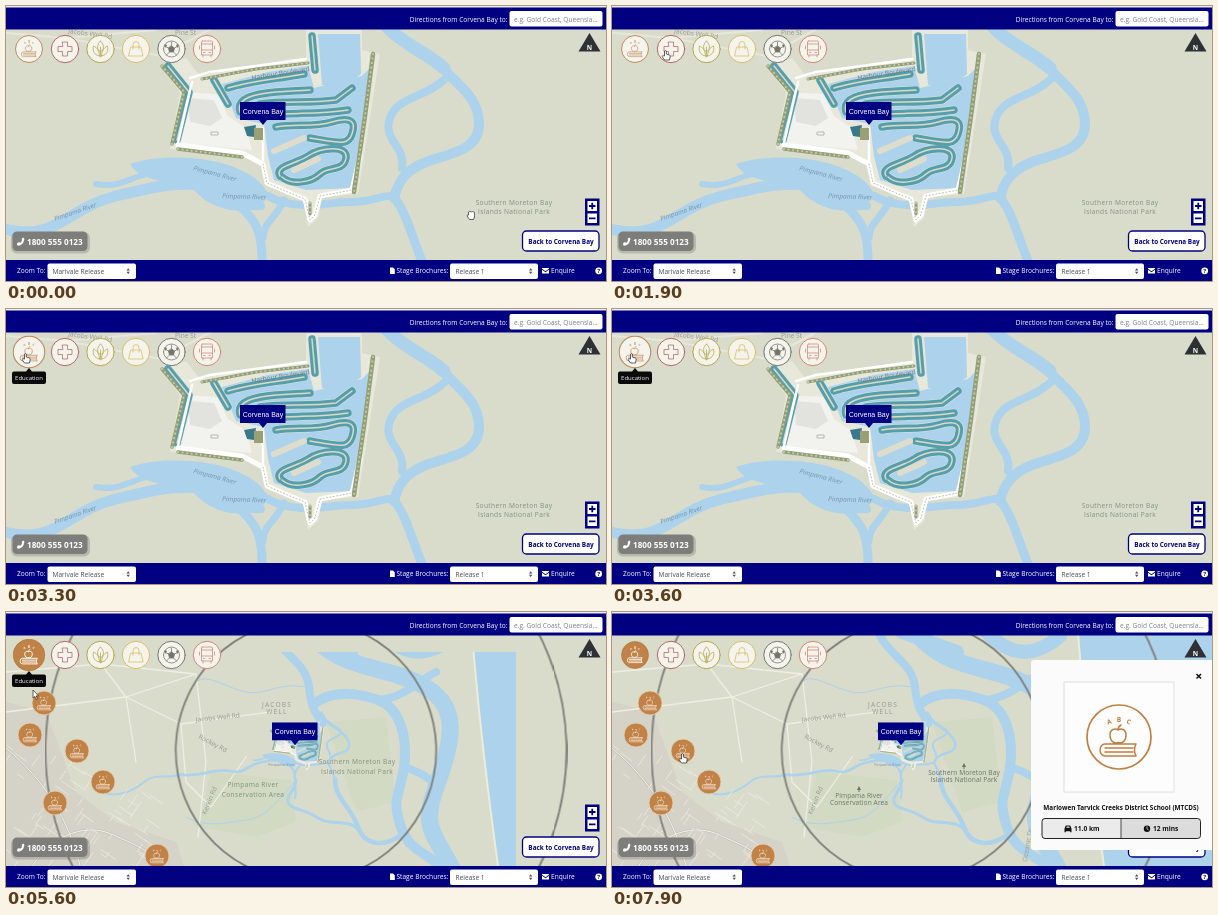
Recreate the animation shown at these times as an HTML page. Size 600 by 275 pixels, loop 8000 ms.

```html
<!DOCTYPE html>
<html lang="en">
<head>
<meta charset="utf-8">
<title>Estate map</title>
<style>
html, body { margin: 0; width: 100%; height: 100%; overflow: hidden; background: #d9dcca; }
svg { position: absolute; left: 0; top: 0; width: 600px; height: 275px; }
text { font-family: "Open Sans", "Noto Sans", sans-serif; font-size: 6.6px; }
.mid { text-anchor: middle; }
.bold { font-weight: 700; }
.line { fill: none; stroke-linecap: round; stroke-linejoin: round; }
.water { stroke: #add2eb; }
.park { fill: #83907f; letter-spacing: .35px; font-size: 6.7px; }
.small { fill: #68746a; font-size: 4.8px; letter-spacing: .1px; }
.street { fill: #96998f; font-size: 4.6px; }
.river { fill: #7496ae; font-size: 5.2px; font-style: italic; }

/* every state runs on one 8 s clock; 1.25% = 100 ms */
.near, .far, .zoom, .pin, .hover, .active, .rest, .tip, .marks, .wideA, .tinyA, .wideB, .tinyB,
.panel, .loaded, .short, .tall, .shift, .move, .grab, .point, .arrow { animation: 8s step-end infinite; }
.near { animation-name: near; }
.far { animation-name: tiles; }
.zoom { transform-origin: 300px 138px; animation-name: zoom; }
.pin { animation-name: pin; }
.hover { transform-origin: 23px 43px; animation-name: hover; }
.active { animation-name: active; }
.rest { animation-name: rest; }
.tip { animation-name: tip; }
.marks { animation-name: marks; }
.wideA { animation-name: untilA; }
.tinyA { animation-name: fromA; }
.wideB, .short { animation-name: untilB; }
.tinyB, .tall, .loaded { animation-name: fromB; }
.shift { animation-name: shift; }
.panel { animation-name: slide; }
.move { animation-name: move; }
.grab { animation-name: grab; }
.point { animation-name: point; }
.arrow { animation-name: arrow; }

@keyframes near { 0% { visibility: visible } 52.5%, 100% { visibility: hidden } }
@keyframes tiles {
  0% { visibility: hidden; clip-path: inset(96px 203px 66px 173px) }
  52.5% { visibility: visible; clip-path: inset(96px 203px 66px 173px) }
  57.5% { visibility: visible; clip-path: inset(40px 90px 0 0) }
  77.5%, 100% { visibility: visible; clip-path: inset(0) }
}
@keyframes zoom {
  0% { transform: scale(1) } 47.5% { transform: scale(.7) }
  48.75% { transform: scale(.36) } 52.5%, 100% { transform: scale(.25) }
}
@keyframes pin {
  0% { transform: translate(257px, 119px) } 47.5% { transform: translate(269.9px, 124.7px) }
  48.75% { transform: translate(284.5px, 131.2px) } 52.5%, 100% { transform: translate(289px, 133.3px) }
}
@keyframes hover { 0% { transform: none } 40% { transform: scale(1.17) } 77.5%, 100% { transform: none } }
@keyframes active { 0% { visibility: hidden } 47.5%, 100% { visibility: visible } }
@keyframes rest { 0% { visibility: visible } 47.5%, 100% { visibility: hidden } }
@keyframes tip { 0% { visibility: hidden } 40% { visibility: visible } 77.5%, 100% { visibility: hidden } }
@keyframes marks { 0% { visibility: hidden } 55%, 100% { visibility: visible } }
@keyframes untilA { 0% { opacity: 1 } 77.5%, 100% { opacity: 0 } }
@keyframes fromA { 0% { opacity: 0 } 77.5%, 100% { opacity: 1 } }
@keyframes untilB { 0% { opacity: 1 } 95%, 100% { opacity: 0 } }
@keyframes fromB { 0% { opacity: 0 } 95%, 100% { opacity: 1 } }
@keyframes shift { 0% { transform: translateY(-66px) } 95%, 100% { transform: none } }
@keyframes slide {
  0% { transform: translateX(182px) } 86.25% { transform: translateX(170px) }
  87.5% { transform: translateX(105px) } 88.75% { transform: translateX(49px) }
  90% { transform: translateX(20px) } 91.25% { transform: translateX(5px) }
  92.5%, 100% { transform: none }
}
@keyframes move {
  0% { transform: translate(465px, 209px) }
  2.5% { transform: translate(465px, 209px); animation-timing-function: steps(2, jump-start) }
  5% { transform: translate(435px, 112px) }
  7.5% { transform: translate(415px, 105px) }
  10% { transform: translate(415px, 105px); animation-timing-function: steps(7, jump-start) }
  18.75% { transform: translate(190px, 62px) }
  20% { transform: translate(190px, 62px); animation-timing-function: steps(2, jump-start) }
  22.5% { transform: translate(90px, 52px) }
  23.75% { transform: translate(54px, 49px) }
  25% { transform: translate(51px, 50px) }
  27.5% { transform: translate(51px, 50px); animation-timing-function: steps(7, jump-start) }
  36.25% { transform: translate(32px, 53px) }
  37.5% { transform: translate(27px, 51px) }
  40% { transform: translate(20px, 49px) }
  61.25% { transform: translate(22px, 60px) }
  63.75% { transform: translate(22px, 60px); animation-timing-function: steps(2, jump-start) }
  66.25% { transform: translate(26px, 76px) }
  70% { transform: translate(27px, 78px) }
  77.5%, 100% { transform: translate(71px, 146px) }
}
@keyframes grab { 0% { visibility: visible } 20%, 100% { visibility: hidden } }
@keyframes point { 0% { visibility: hidden } 20% { visibility: visible } 61.25% { visibility: hidden } 77.5%, 100% { visibility: visible } }
@keyframes arrow { 0% { visibility: hidden } 61.25% { visibility: visible } 77.5%, 100% { visibility: hidden } }
</style>
</head>
<body>

<svg class="near" viewBox="0 0 600 275">
  <defs>
    <g id="rivers" class="line water">
      <path stroke-width="11" d="M-210 236C-120 250 -60 206 -5 222S60 202 110 190S165 178 200 178"/>
      <path stroke="none" fill="#add2eb" d="M124 158C150 148 200 150 225 160S255 176 264 190L250 202C230 206 200 198 190 186S136 180 124 158Z"/>
      <path stroke-width="6" d="M90 178C110 182 120 174 140 168"/>
      <path stroke-width="8" d="M200 190C222 204 232 200 255 200"/>
      <path stroke-width="9" d="M232 198C250 215 257 225 256 260S262 300 256 330"/>
      <path stroke-width="7" d="M278 194C268 215 258 215 257 232"/>
      <path stroke-width="8" d="M262 190C290 206 320 196 345 196S380 186 390 192"/>
      <path stroke-width="9" d="M386 190C398 200 404 225 416 255L422 300"/>
      <path stroke-width="13" d="M362 -10C380 35 410 38 438 62"/>
      <path stroke-width="10" d="M430 55C450 78 473 90 473 118S440 148 420 156S392 175 388 192"/>
      <path stroke-width="8" d="M440 72C420 92 392 90 384 112S400 140 396 162"/>
    </g>
    <g id="estate">
      <path fill="#e7e7da" d="M154 60L180 52L194 70L240 60L300 52V24H356V44L374 48L352 188L316 191L312 212L302 221L297 192L262 180L256 156L236 148L164 143L174 86Z"/>
      <path fill="#f2f2ef" d="M176 86L212 88L222 110L240 122L246 144L170 137Z"/>
      <path fill="#e2e3df" d="M182 92L208 94L216 112L204 120L184 116Z"/>
      <path fill="#add2eb" d="M216 78L262 66L302 60L308 82L356 70L364 62L346 182L300 184L268 174L262 150L258 118L230 112Z"/>
      <path fill="#add2eb" d="M312 28H354L355 68Q340 82 316 79Z"/>
      <g id="lots" class="line"></g>
      <g class="line" stroke="#fff">
        <path stroke-width="5" d="M172 139L236 147L257 158L261 177L284 187L299 193L304 214L309 209L314 190L346 184L354 150"/>
        <path stroke="#bab7a8" stroke-width=".9" stroke-dasharray="1 2.4" d="M257 124L257 158L261 177L284 187L299 193L304 214L309 209L314 190L346 184L354 150"/>
        <path stroke-width="2.5" d="M184 72L204 66L250 60L300 53M186 76L172 137M257 122V156"/>
      </g>
      <g class="line" id="trees" stroke="#93a077">
        <path stroke-width="3.500" d="M156 60L178 86L166 138"/>
        <path stroke-width="3.500" d="M172 143L236 151"/>
        <path stroke-width="4.500" d="M367 48L359 110L348 186"/>
        <path stroke-width="3" d="M196 73L250 63L302 57"/>
        <path stroke-width="3" d="M304 197L304 208"/>
      </g>
      <path fill="#39798c" d="M238 121L250 119L248 131L241 130Z"/>
      <path fill="#9a9f74" d="M248 122h9v12h-9z"/>
      <path fill="none" stroke="#a9aaa2" stroke-width=".8" d="M205 126h7v3h-7z"/>
    </g>
    <g id="edu">
      <g fill="currentColor" stroke="none" class="mid bold">
        <text transform="translate(-9 -13) rotate(-20)">A</text>
        <text y="-15">B</text>
        <text transform="translate(9 -13) rotate(20)">C</text>
      </g>
      <path class="line" stroke="currentColor" d="M-1 -7C-4 -9 -9 -8 -9 -2C-9 4 -5 7 -1 5.5C3 7 7 4 7 -2C7 -8 2 -9 -1 -7C-1 -10 0 -11 2 -12M17 7H-14a5 6 0 0 0 0 12H17M17 7q-3 6 0 12M-14 11H14M-14 15H14"/>
    </g>
  </defs>
  <g class="zoom">
    <use href="#rivers"/>
    <path class="line" stroke="#e6e6da" stroke-width="2" d="M-200 10L60 32L155 50L210 20M60 32L150 24"/>
    <use href="#estate"/>
    <g class="street">
      <text transform="translate(62 27) rotate(8)">Jacobs Well Rd</text>
      <text x="169" y="29">Pine St</text>
      <text transform="translate(246 74) rotate(-9)" fill="#777">Harbour Boulevard</text>
    </g>
    <g class="river">
      <text transform="translate(187 164) rotate(15)">Pimpama River</text>
      <text transform="translate(216 192) rotate(2)">Pimpama River</text>
      <text transform="translate(49 215) rotate(-19)">Pimpama River</text>
    </g>
    <g class="park mid"><text x="508" y="199">Southern Moreton Bay</text><text x="508" y="208">Islands National Park</text></g>
  </g>
</svg>

<svg class="far" viewBox="0 0 600 275">
  <path fill="#d1dac2" opacity=".7" d="M205 160L285 168L290 210L250 225L190 215ZM320 110L380 105L390 190L350 200Z"/>
  <path fill="#d5d2c7" d="M0 90L40 100L70 180L110 210L170 230L180 260H0Z"/>
  <g class="line water">
    <path stroke-width="8" d="M264 15C275 45 300 48 303 75S310 98 316 112"/>
    <path stroke-width="10" d="M308 92C325 78 350 80 372 88S402 125 398 155S385 185 395 215S430 240 437 262"/>
    <path stroke-width="17" d="M300 15C330 60 380 52 418 74S446 130 430 175S430 220 450 265"/>
    <path stroke-width="14" d="M370 15C395 44 420 48 448 24M290 20L345 40"/>
    <path stroke-width="8" d="M372 88C400 85 410 70 430 60M398 155C415 160 420 165 430 172"/>
    <path stroke-width="4.500" d="M329 167C328 185 345 195 352 215S380 235 396 222"/>
    <path stroke-width="3" d="M290 168C288 182 280 182 282 190S300 197 312 206S345 205 354 220"/>
    <path stroke-width="2" d="M178 162C160 168 150 160 138 170S110 186 95 180"/>
    <path stroke-width="1" d="M300 75C270 70 260 84 240 80S200 60 190 70M290 168C270 190 262 205 240 208S200 216 180 205"/>
  </g>
  <path fill="#add2eb" d="M466 15C471 80 478 150 494 265H605V15Z"/>
  <path class="line" stroke="#edebd9" stroke-width="2" d="M465.500 15C470.500 80 477.500 150 493.500 265"/>
  <g class="line" stroke="#efeee5">
    <path stroke-width="1.300" d="M120 85L175 112L265 100M190 62L200 150L192 225M0 100L120 85L190 62M175 112L180 170L205 195L240 145M0 60L95 52L190 62M95 52L120 85L130 150"/>
    <path stroke-width="2.600" stroke="#c6c6bf" d="M-5 132C30 160 62 198 76 262M22 262C40 225 78 210 105 222S150 240 160 262"/>
    <path stroke-width="1" stroke="#f2f1e8" d="M-5 132C30 160 62 198 76 262M22 262C40 225 78 210 105 222S150 240 160 262"/>
    <g id="lanes" stroke-width=".7"></g>
  </g>
  <g transform="translate(225 103.500) scale(.25)"><use href="#rivers"/><use href="#estate"/></g>
  <g class="street">
    <g class="mid" letter-spacing="1.200"><text x="271" y="95">JACOBS</text><text x="271" y="102">WELL</text></g>
    <text transform="translate(190 110) rotate(-6)">Jacobs Well Rd</text>
    <text transform="translate(192 126) rotate(28)">Rockey Rd</text>
    <text transform="translate(200 203) rotate(-68)">Kerkin Rd</text>
    <text transform="translate(415 250) rotate(-80)" class="tinyA">Oceanic Dr</text>
    <text x="487" y="236" class="tinyA">MBNTZ</text>
  </g>
  <g class="river"><text x="262" y="154" style="font-size:4px">Pimpama River</text></g>
  <g class="park mid wideA"><text x="351" y="152">Southern Moreton Bay</text><text x="351" y="161.500">Islands National Park</text></g>
  <g class="park mid wideB" style="fill:#7b937a"><text x="247" y="175">Pimpama River</text><text x="247" y="184.500">Conservation Area</text></g>
  <g class="small mid tinyA"><path d="M352 151l-2 4h1.500v2h1v-2h1.500z"/><text x="352" y="163">Southern Moreton Bay</text><text x="352" y="170">Islands National Park</text></g>
  <g class="small mid tinyB"><path d="M247 174l-2 4h1.500v2h1v-2h1.500z"/><text x="247" y="186">Pimpama River</text><text x="247" y="192.500">Conservation Area</text></g>
</svg>

<svg viewBox="0 0 600 275">
  <g class="zoom" fill="none" stroke="#7c7d7a" stroke-width="1.800">
    <circle cx="300" cy="140" r="521" vector-effect="non-scaling-stroke"/>
    <circle cx="300" cy="140" r="1042" vector-effect="non-scaling-stroke"/>
  </g>
  <g class="marks" id="marks"></g>
  <g class="pin">
    <path fill="#000080" d="M-23 -23h45.500v18H4L0 0L-4 -5H-23Z"/>
    <text class="mid" y="-11.500" fill="#fff" style="font:7px 'Liberation Sans',sans-serif">Corvena Bay</text>
  </g>

  <g id="tools" class="line" stroke-width=".75"></g>
  <g class="hover">
    <g class="rest" color="#c6946a" stroke-width="1.700">
      <circle cx="23" cy="43" r="13.500" fill="#f4f3ec" stroke="#bd8a5e" stroke-width="1"/>
      <use href="#edu" transform="translate(23 43) scale(.4)"/>
    </g>
    <g class="active" color="#fff" stroke-width="2">
      <circle cx="23" cy="43" r="13.500" fill="#c08246" stroke="#b0733a" stroke-width=".6"/>
      <use href="#edu" transform="translate(23 43) scale(.4)"/>
    </g>
  </g>
  <g class="tip">
    <path fill="#0a0a0a" d="M23 59l3 3.500H38q2 0 2 2V73q0 2 -2 2H8q-2 0 -2 -2V64.500q0 -2 2 -2H20Z"/>
    <text class="mid" x="23" y="71" fill="#fff" style="font-size:6px">Education</text>
  </g>

  <path fill="#2f3033" d="M583.500 27L594.500 45.500H572.500Z"/>
  <text class="mid bold" x="583.500" y="44" fill="#fff">N</text>

  <rect x="579" y="192.500" width="14.500" height="27" fill="#000080"/>
  <path fill="#fff" d="M581.500 195h9.500v10h-9.500zM581.500 207.500h9.500v9.500h-9.500z"/>
  <path stroke="#000080" stroke-width="1.800" d="M583 200h6.500M586.250 196.700v6.600M583 212.300h6.500"/>

  <rect x="516.500" y="225" width="76.500" height="20" rx="4" fill="#fff" stroke="#000080" stroke-width="1.300"/>
  <text class="mid bold" x="555" y="237.500" fill="#000080" style="font-size:6.400px">Back to Corvena Bay</text>

  <rect x="5" y="226" width="79" height="21.500" rx="6" fill="#555" opacity=".25"/>
  <rect x="6.500" y="225.500" width="75" height="19.500" rx="4.500" fill="#7d7d7a"/>
  <path class="line" stroke="#fff" stroke-width="2" d="M12 238.500q5 -.5 5 -5"/>
  <path fill="#fff" d="M11 237l2.300-1 1.500 2.500-2 1.300zM15.500 233l2-1.500 1 1.500-1 2z"/>
  <text class="bold" x="21" y="238.500" fill="#fff" style="font-size:8.200px">1800 555 0123</text>

  <g class="panel">
    <path class="short" fill="#fcfbfc" d="M422 48H602V172H422q-3 0 -3 -3V51q0 -3 3 -3Z"/>
    <path class="tall" fill="#fcfbfc" d="M422 48H602V238H422q-3 0 -3 -3V51q0 -3 3 -3Z"/>
    <path stroke="#111" stroke-width="1.500" d="M584.500 62l4.500 4.500m0 -4.500l-4.500 4.500"/>
    <g class="loaded">
      <rect x="452" y="70" width="110" height="110" fill="#fdfdfd" stroke="#dedee0"/>
      <g color="#c27f40" stroke-width="1.500" transform="translate(507 125)">
        <circle r="32" fill="none" stroke="#c27f40" stroke-width="1.700"/><use href="#edu"/>
      </g>
    </g>
    <g class="shift">
      <text class="mid bold" x="509" y="198" fill="#111" style="font-size:6.400px">Marlowen Tarvick Creeks District School (MTCDS)</text>
      <path fill="#ebebeb" d="M433 206.500H509V226.500H433q-3 0 -3 -3V209.500q0 -3 3 -3Z"/>
      <path fill="#dcdcdc" d="M509 206.500H585.500q3 0 3 3V223.500q0 3 -3 3H509Z"/>
      <rect x="430" y="206.500" width="158.500" height="20" rx="3" fill="none" stroke="#222"/>
      <path stroke="#222" stroke-width=".8" d="M509 206.500v20"/>
      <path fill="#111" d="M452.500 216.500l1.300-3h4.400l1.300 3v3.700h-1.300v-1h-4.400v1h-1.300z"/>
      <path fill="#ebebeb" d="M454.200 215.800l.6-1.400h2.400l.6 1.400z"/>
      <circle cx="535" cy="216.700" r="3.200" fill="#111"/>
      <path class="line" stroke="#fff" stroke-width=".7" d="M535 214.700v2.100l1.300 .9"/>
      <g class="bold" fill="#111"><text x="462" y="219">11.0 km</text><text x="541" y="219">12 mins</text></g>
    </g>
  </g>

  <rect width="600" height="2" fill="#eeeef2"/>
  <path fill="#000080" d="M0 1.500H600V23.500H0ZM0 254H600V275H0Z"/>
  <g fill="#fff">
    <text x="501.500" y="15.500" text-anchor="end">Directions from Corvena Bay to:</text>
    <rect x="503.500" y="5" width="93" height="15.500" rx="2"/>
    <text x="11" y="267">Zoom To:</text>
    <rect x="41.500" y="257.500" width="88.500" height="15.500" rx="2"/>
    <path d="M384 261.500h3l1.800 1.800v4.700H384z"/>
    <text x="390.500" y="267">Stage Brochures:</text>
    <rect x="444" y="257.500" width="88" height="15.500" rx="2"/>
    <path d="M536 262h7v.8l-3.500 2.500-3.500-2.500zM536 263.700l3.500 2.500 3.500-2.500v3.800h-7z"/>
    <text x="545" y="267">Enquire</text>
    <circle cx="592.700" cy="264.800" r="3.400"/>
  </g>
  <text class="mid bold" x="592.700" y="267" fill="#000080" style="font-size:6px">?</text>
  <text x="508" y="15.500" fill="#7b8088">e.g. Gold Coast, Queensla...</text>
  <g fill="#495057">
    <text x="46.500" y="267.500">Marivale Release</text><text x="449.500" y="267.500">Release 1</text>
    <path d="M120.500 264.600l1.700-2.300 1.700 2.300zM120.500 265.800l1.700 2.300 1.700-2.300zM523 264.600l1.700-2.300 1.700 2.300zM523 265.800l1.700 2.300 1.700-2.300z"/>
  </g>

  <g class="move" fill="#fff" stroke="#222" stroke-width=".7" stroke-linejoin="round">
    <path class="grab" d="M-2.500 0V-3q.8-1 1.500 0q.8-1.500 1.600 0q.8-1 1.500 0q.9-.6 1.400 .4V2L2.500 4.500H-1.500L-4 1q0-1.200 1.500-1Z"/>
    <path class="point" d="M-1.500 1V-4q.9-1.200 1.800 0V-1L3.500 0q.8 .3 .7 1.200L3.500 5H-1.500L-4 1.500q.4-1.300 2.500-.5Z"/>
    <path class="arrow" d="M0 0V8L1.800 6.400L3.200 9.300L4.500 8.700L3.200 5.900H5.600Z"/>
  </g>
</svg>

<script>
const fill = (id, html) => { document.getElementById(id).innerHTML += html; };

// housing fingers: teal lots either side of a pale road
const roads = [
  'M222 82C240 76 262 74 298 68',
  'M234 106C230 92 248 88 270 86L304 84',
  'M254 98C280 94 300 98 330 94L346 82',
  'M264 109C290 106 310 109 342 104',
  'M270 121C290 117 306 122 326 116S350 116 346 128S334 137 304 132',
  'M274 170C268 160 290 158 302 150S342 138 340 152S322 160 314 168S286 180 276 171',
  'M306 30L309 64',
  'M162 60L183 86L171 134',
  'M208 74L222 98'
];
const stroke = (color, width, extra = '') => roads.map(d =>
  `<path d="${d}" stroke="${color}" stroke-width="${width}" ${extra}/>`).join('');
fill('lots', stroke('#d9e3dc', 8.5) + stroke('#559fac', 7.5) + stroke('#dcd9c4', 1.5) +
  '<path d="M268 145L298 132M288 164L312 153" stroke="#dedccb" stroke-width="6"/>');

// rough canopy over the tree belts
const belts = [...document.querySelectorAll('#trees path')];
fill('trees', belts.map(b => `<path d="${b.getAttribute('d')}" stroke="#c9cdb0" stroke-width="2" stroke-dasharray="0 4.6"/>`).join(''));

let seed = 7;
const rnd = () => (seed = seed * 16807 % 2147483647) / 2147483647;
let lanes = '';
for (let i = 0; i < 70; i++) {
  const x = rnd() * 150, y = 95 + x * .6 + rnd() * (155 - x * .6), len = 5 + rnd() * 14;
  const a = .6 + (i % 2) * 1.57;
  lanes += `M${x} ${y}l${len * Math.cos(a)} ${len * Math.sin(a)}`;
}
fill('lanes', `<path d="${lanes}"/>`);

const schools = [[38, 91], [24, 123], [71, 139], [97, 170], [49, 191], [151, 244]];
fill('marks', schools.map(([x, y]) => `<g transform="translate(${x} ${y})" color="#f6eadc" stroke-width="1.8">
  <circle r="12" fill="#c08246" stroke="#e6d3b8" stroke-width=".8"/><use href="#edu" transform="scale(.36)"/></g>`).join(''));

const tools = [
  [59, '#b5665c', 'M-2.500 -7h5v4.500H7v5H2.500V7h-5V2.500H-7v-5h4.500Z'],
  [94.500, '#b3a548', 'M0 8V-2M0 -8C-4 -4 -4 0 0 3C4 0 4 -4 0 -8M-1 7C-7 6 -8 1 -7 -3C-4 -2 -1 2 -1 7M1 7C7 6 8 1 7 -3C4 -2 1 2 1 7'],
  [130, '#d6bd62', 'M-5 -2H5L7 7H-7ZM-3 0V-4a3 3.500 0 0 1 6 0V0'],
  [165.500, '#74746e', 'M-8 0a8 8 0 1 0 16 0a8 8 0 1 0 -16 0M0 -3L3 -1L2 3H-2L-3 -1ZM0 -3V-7M3 -1L7 -3M2 3L5 6M-2 3L-5 6M-3 -1L-7 -3'],
  [201, '#d08670', 'M-4.500 -8H4.500q1 0 1 1V6H-5.500V-7q0 -1 1 -1M-5.500 -5H5.500M-5.500 1H5.500M-4 6V8M4 6V8M-3.500 3.500H-2M2 3.500H3.500M-7.500 -3V0M7.500 -3V0']
];
fill('tools', tools.map(([x, color, d]) => `<g transform="translate(${x} 43)" stroke="${color}">
  <circle r="13.700" fill="#f4f3ec" stroke-width="1"/><path d="${d}"/></g>`).join('') +
  '<path fill="#74746e" stroke="none" d="M165.500 40l3 2-1 4h-4l-1-4zM158.500 38l2.500 1-1.500 3zM172.500 38l-2.500 1 1.500 3z"/>');
</script>
</body>
</html>
```
